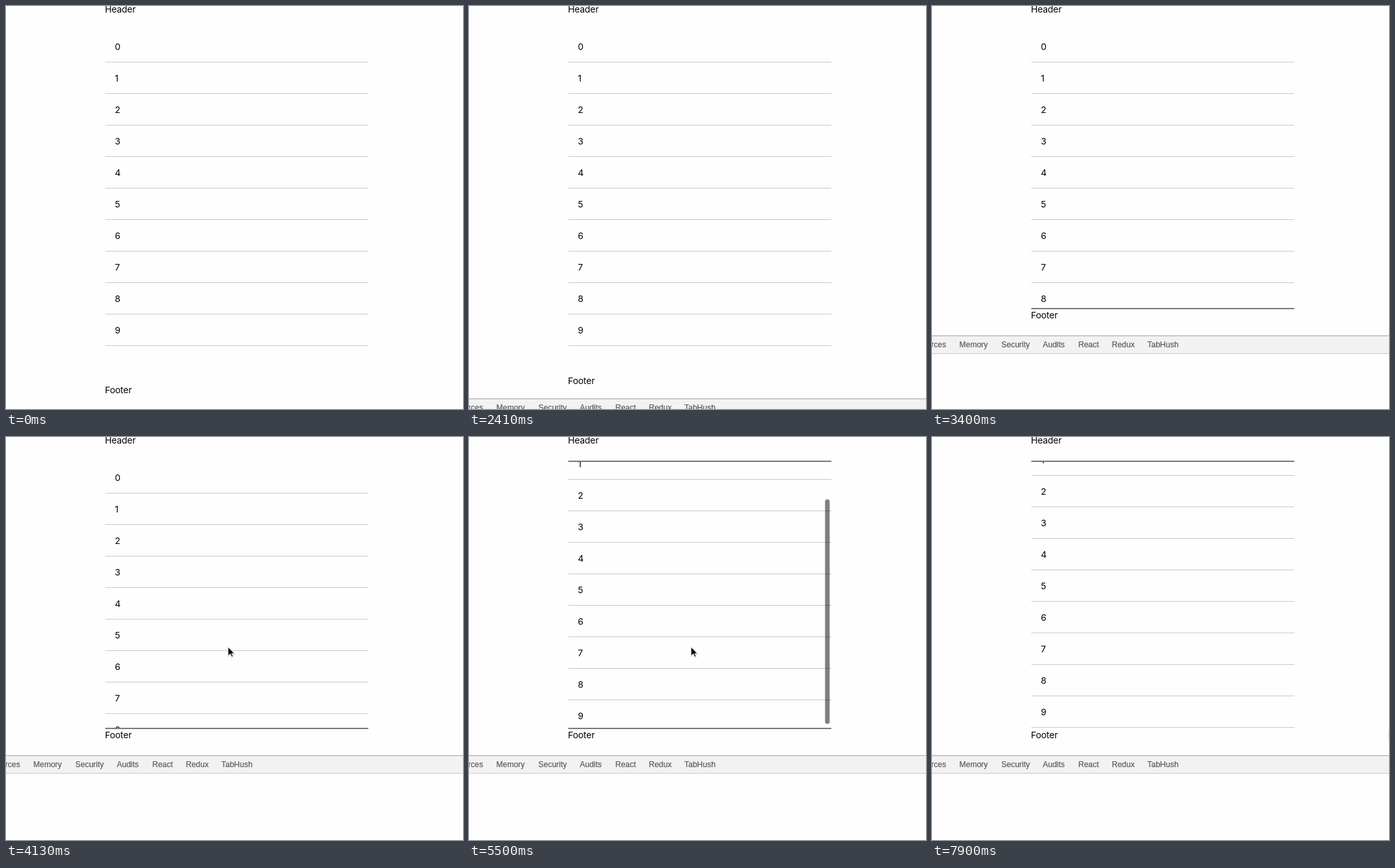
Animation of 695x614 px, one loop 7990 ms. Source, as an HTML page:

```html
<!DOCTYPE html>
<html lang="en">
<head>
<meta charset="utf-8">
<title>Scrolling list</title>
<style>
  html, body { margin: 0; width: 100%; height: 100%; overflow: hidden; background: #fefefe; }
  svg { display: block; }
  .page { font: 13.7px Inter, "Open Sans", sans-serif; letter-spacing: -.12px; fill: #000; }
  .tabs { font: 12px "Liberation Sans", Arial, sans-serif; fill: #5a5a5a; stroke: #5a5a5a; stroke-width: .2px; }
</style>
</head>
<body>
<svg width="695" height="614" viewBox="0 0 695 614">
  <defs>
    <clipPath id="view"><rect id="viewBox" x="151" y="38" width="400" height="480"/></clipPath>
  </defs>
  <g class="page">
    <text x="150.5" y="10">Header</text>
    <g clip-path="url(#view)"><g id="rows"></g></g>
    <text id="footer" x="150.5">Footer</text>
  </g>
  <rect id="topEdge" x="151" y="36" width="400" height="2" fill="#7a7a7a"/>
  <rect id="endEdge" x="151" width="400" height="2" fill="#7a7a7a"/>
  <rect id="thumb" x="541.5" width="7" height="342" rx="3.5" fill="#000"/>
  <g id="panel" class="tabs">
    <rect width="695" height="200" fill="#fefefe" stroke="none"/>
    <rect width="695" height="28" fill="#f2f2f2" stroke="none"/>
    <rect width="695" height="1" fill="#a3a3a3" stroke="none"/>
    <rect y="27" width="695" height="1" fill="#cbcbcb" stroke="none"/>
  </g>
  <g id="cursor">
    <path d="M1 2V16.3L4.2 13.3 6.3 17.5 9.2 16.2 7.5 12.3H11.7Z" fill="#000" opacity=".18"/>
    <path d="M.4 .4V15.4L4 12.2 6.1 16.8 9 15.5 7 11.3H11.2Z" fill="#fff" stroke="#ccc" stroke-width=".5"/>
    <path d="M1.2 2V13.5L4.2 10.8 6.6 15.6 7.8 15 5.6 10.4H9.4Z"/>
  </g>
</svg>
<script>
const LOOP = 7990, TOP = 38, ROW = 48, COUNT = 10;
const END = TOP + ROW * COUNT;
const $ = id => document.getElementById(id);

function add(parent, tag, attrs, text = "") {
  const el = document.createElementNS("http://www.w3.org/2000/svg", tag);
  for (const key in attrs) el.setAttribute(key, attrs[key]);
  el.textContent = text;
  parent.append(el);
}

for (let i = 0; i < COUNT; i++) {
  const y = TOP + ROW * i;
  add($("rows"), "text", { x: 165.5, y: y + 29 }, i);
  add($("rows"), "rect", { x: 151, y: y + 47, width: 400, height: 1, fill: "#cacaca" });
}
add($("panel"), "text", { x: 21.5, y: 18, "text-anchor": "end" }, "Sources");
[["Memory", 41.5], ["Security", 105.5], ["Audits", 168.5], ["React", 222.5], ["Redux", 273.5], ["TabHush", 327.5]]
  .forEach(([name, x]) => add($("panel"), "text", { x, y: 18 }, name));

const mix = (a, b, p) => a + (b - a) * p;
const inOut = k => p => p < .5 ? .5 * (2 * p) ** k : 1 - .5 * (2 - 2 * p) ** k;
const out = k => p => 1 - (1 - p) ** k;

// Progress in n held steps; the first step lands at start, the last at end.
function steps(t, start, end, n, ease) {
  if (t < start) return 0;
  const k = Math.floor((t - start + 12) / (end - start) * (n - 1));
  return ease(Math.min(1, (k + 1) / n));
}

function panelTop(t) {
  return Math.round(616
    - 14 * steps(t, 500, 700, 3, inOut(1.5))
    - 74 * steps(t, 2410, 3140, 8, inOut(1.6))
    - 43 * steps(t, 3220, 3690, 6, out(1.34)));
}

function scrollPos(t) {
  return Math.round(75 * (
    steps(t, 4520, 4870, 5, inOut(1.8))
    - steps(t, 5500, 5850, 5, inOut(2))
    + steps(t, 6470, 6740, 4, inOut(1.53))));
}

function cursorPos(t) {
  if (t < 4130) {
    const p = out(1.6)(Math.floor((t - 3870 + 12) / 260 * 3) / 3);
    return [mix(666, 337, p), mix(465, 319, p)];
  }
  const p = steps(t, 7370, 7900, 7, inOut(1.7));
  return [mix(337, 694, p), mix(319, 447, p)];
}

function draw(t) {
  const top = panelTop(t);
  const footer = top + (t >= 2410 && t < 3140 ? 4 : 0);
  const bottom = Math.min(END, footer - 42);
  const scroll = scrollPos(t);

  $("panel").setAttribute("transform", `translate(0 ${top})`);
  $("footer").setAttribute("y", footer - 26);
  $("viewBox").setAttribute("height", bottom - TOP);
  $("rows").setAttribute("transform", `translate(0 ${-scroll})`);
  $("topEdge").setAttribute("opacity", scroll > 0 ? 1 : 0);
  $("endEdge").setAttribute("y", bottom);
  $("endEdge").setAttribute("opacity", END - scroll > bottom ? 1 : 0);

  const fade = steps(t, 7370, 7640, 4, p => p);
  $("thumb").setAttribute("y", 37 + Math.round(scroll * .844));
  $("thumb").setAttribute("opacity", t < 4520 ? 0 : .5 * (1 - fade));

  const [x, y] = cursorPos(t).map(Math.round);
  $("cursor").setAttribute("transform", `translate(${x} ${y})`);
  $("cursor").setAttribute("opacity", t < 3870 ? 0 : 1);
}

let begin;
function tick(now) {
  begin ??= now;
  draw((now - begin) % LOOP);
  requestAnimationFrame(tick);
}
draw(0);
requestAnimationFrame(tick);
</script>
</body>
</html>
```
